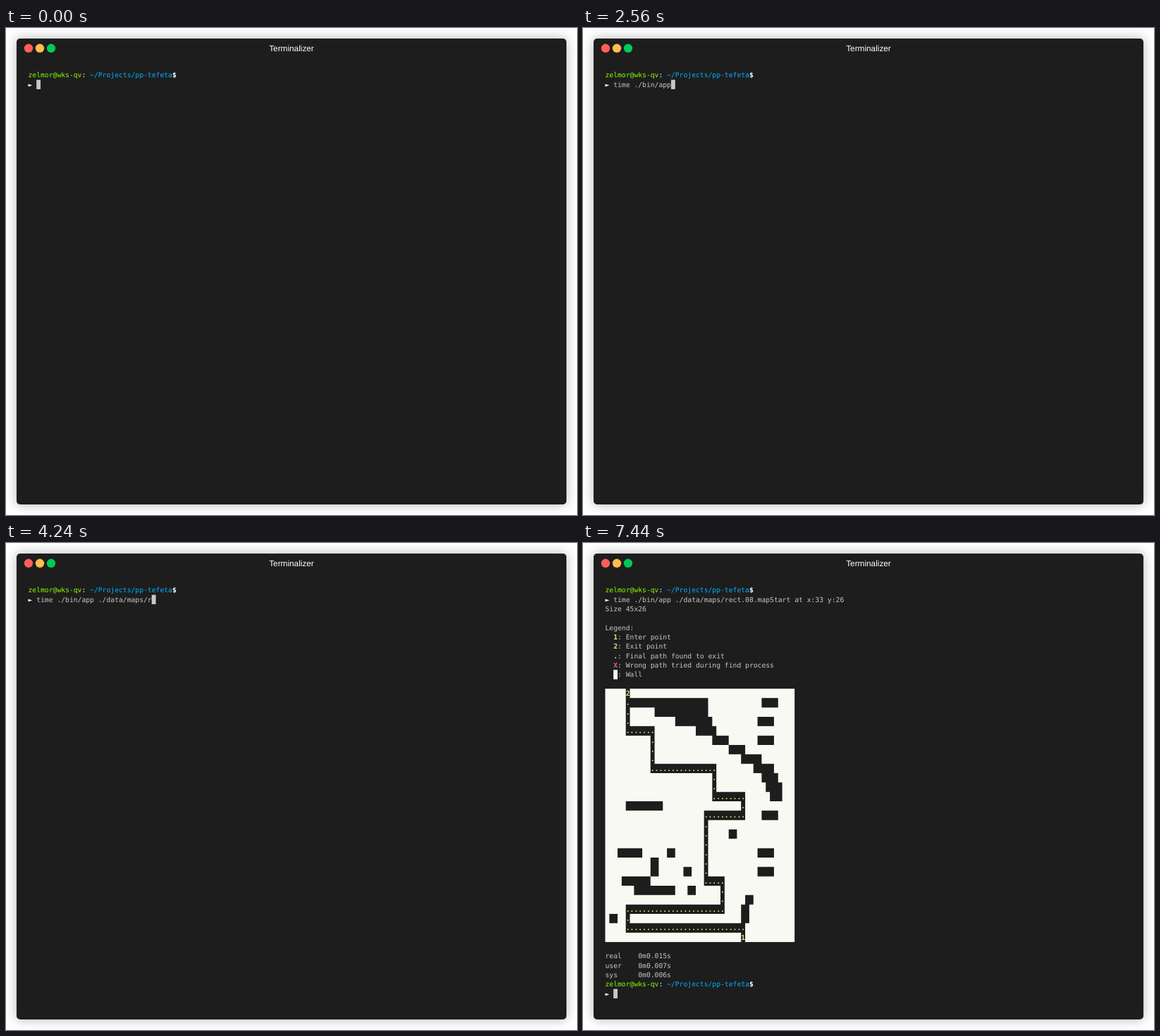
Animation of 810x692 px, one loop 8070 ms. Source, as an HTML page with a canvas:

```html
<!DOCTYPE html>
<html lang="en">
<head>
<meta charset="utf-8">
<title>Terminal</title>
<style>
  html, body { margin: 0; width: 100%; height: 100%; overflow: hidden; background: #fff; }
  canvas { display: block; }
</style>
</head>
<body>
<canvas id="stage" width="810" height="692"></canvas>
<script>
const ctx = document.getElementById('stage').getContext('2d');
ctx.textRendering = 'geometricPrecision';

const LOOP = 8070, TYPE_START = 1000, KEY_TIME = 120, RUN_AT = 7440;
const LEFT = 31.5, TOP = 60.3, CELL_W = 5.84, CELL_H = 13.335;
const BG = '#1d1d1d', GREY = '#c7c7c7', WALL = '#f9f9f4', MARK = '#d4ee6a';
const COMMAND = 'time ./bin/app ./data/maps/rect.08.map';
const MAP_ROW = 11, MAP_COLS = 46, MAP_ROWS = 27;

const cellX = col => LEFT + col * CELL_W;
const cellY = row => TOP + row * CELL_H;

function block(col, row, cols, rows, color) {
  ctx.fillStyle = color;
  ctx.fillRect(cellX(col), cellY(row), cols * CELL_W, rows * CELL_H);
}

function print(col, row, text, color = GREY, weight = 'normal') {
  ctx.font = weight + ' 9.73px "DejaVu Sans Mono", monospace';
  ctx.textAlign = 'left';
  ctx.fillStyle = color;
  [...text].forEach((ch, i) => ctx.fillText(ch, cellX(col + i), cellY(row) + 9.9));
}

// Walk from the exit through alternating target rows and columns
function findRoute() {
  const turns = [4, 11, 8, 26, 11, 33, 13, 24, 20, 28, 23, 5, 25, 33, 26];
  const pos = [5, 0], route = [[...pos]];
  turns.forEach((goal, i) => {
    const axis = (i + 1) % 2;
    while (pos[axis] !== goal) {
      pos[axis] += Math.sign(goal - pos[axis]);
      route.push([...pos]);
    }
  });
  return route;
}

// All open cells in one path, so neighbours join without seams
function carveMaze(route) {
  const open = new Path2D();
  const carve = (col, row, cols) =>
    open.rect(cellX(col), cellY(MAP_ROW + row), cols * CELL_W, CELL_H);

  for (const [col, row] of route) carve(col, row, 1);

  // Cave running down to the right, between two curves
  for (let row = 1; row <= 11; row++) {
    const from = Math.round(40 - 34 * ((11 - row) / 10) ** 1.8);
    const to = Math.round(43 - 18 / (1 + Math.exp(row - 6)));
    carve(from, row, to - from);
  }

  // Pockets along the right side, then long and small ones elsewhere
  for (const row of [1, 3, 5, 13, 17, 19]) carve(37 + (row % 12 === 1), row, 4);
  for (const [col, row, cols] of [[5, 12, 9], [3, 17, 6], [4, 20, 7], [7, 21, 10]])
    carve(col, row, cols);
  for (const [col, row] of [[30, 15], [15, 17], [11, 18], [11, 19], [19, 19], [20, 21],
    [34, 22], [33, 23], [33, 24], [1, 24]]) carve(col, row, 2);
  return open;
}

const route = findRoute(), openCells = carveMaze(route);

function drawMaze() {
  block(0, MAP_ROW, MAP_COLS, MAP_ROWS, WALL);
  ctx.fillStyle = BG;
  ctx.fill(openCells);
  route.forEach(([col, row], i) => {
    const ch = i === 0 ? '2' : i === route.length - 1 ? '1' : '.';
    print(col, MAP_ROW + row, ch, MARK, 'bold');
  });
}

function drawWindow() {
  ctx.fillStyle = '#fff';
  ctx.fillRect(0, 0, 810, 692);
  ctx.save();
  ctx.shadowColor = 'rgba(0,0,0,.3)';
  ctx.shadowBlur = 16;
  ctx.fillStyle = BG;
  ctx.beginPath();
  ctx.roundRect(15, 15, 780, 662, 5);
  ctx.fill();
  ctx.restore();
  ['#ff5f58', '#ffbd4c', '#00ca56'].forEach((color, i) => {
    ctx.fillStyle = color;
    ctx.beginPath();
    ctx.arc(32 + 16 * i, 28.8, 6.2, 0, 2 * Math.PI);
    ctx.fill();
  });
  ctx.font = '11.8px "Liberation Sans", Arial, sans-serif';
  ctx.textAlign = 'center';
  ctx.fillStyle = '#fff';
  ctx.fillText('Terminalizer', 405, 33.3);
}

function drawPrompt(row) {
  print(0, row, 'zelmor@wks-qv', '#87ff00');
  print(13, row, ':', '#fff');
  print(15, row, '~/Projects/pp-tefeta', '#00afff');
  print(35, row, '$', '#fff', 'bold');
  print(0, row + 1, '►', '#fff');
}

function drawOutput() {
  print(2 + COMMAND.length, 1, 'Start at x:33 y:26');
  print(0, 2, 'Size 45x26');
  print(0, 4, 'Legend:');
  [
    ['1', 'Enter point', MARK],
    ['2', 'Exit point', MARK],
    ['.', 'Final path found to exit', MARK],
    ['X', 'Wrong path tried during find process', '#e8568c'],
    ['█', 'Wall', WALL]
  ].forEach(([key, label, color], i) => {
    if (key === '█') block(2, 5 + i, 1, 1, color);
    else print(2, 5 + i, key, color, 'bold');
    print(3, 5 + i, ': ' + label);
  });
  drawMaze();
  ['real    0m0.015s', 'user    0m0.007s', 'sys     0m0.006s']
    .forEach((line, i) => print(0, 39 + i, line));
  drawPrompt(42);
}

function frame() {
  const t = performance.now() % LOOP, done = t >= RUN_AT;
  const keys = Math.floor((t - TYPE_START) / KEY_TIME) + 1;
  const typed = Math.max(0, Math.min(COMMAND.length, keys));
  drawWindow();
  drawPrompt(0);
  print(2, 1, COMMAND.slice(0, typed));
  if (done) drawOutput();
  block(done ? 2 : 2 + typed, done ? 43 : 1, 1, 1, GREY);
  requestAnimationFrame(frame);
}
frame();
</script>
</body>
</html>
```
